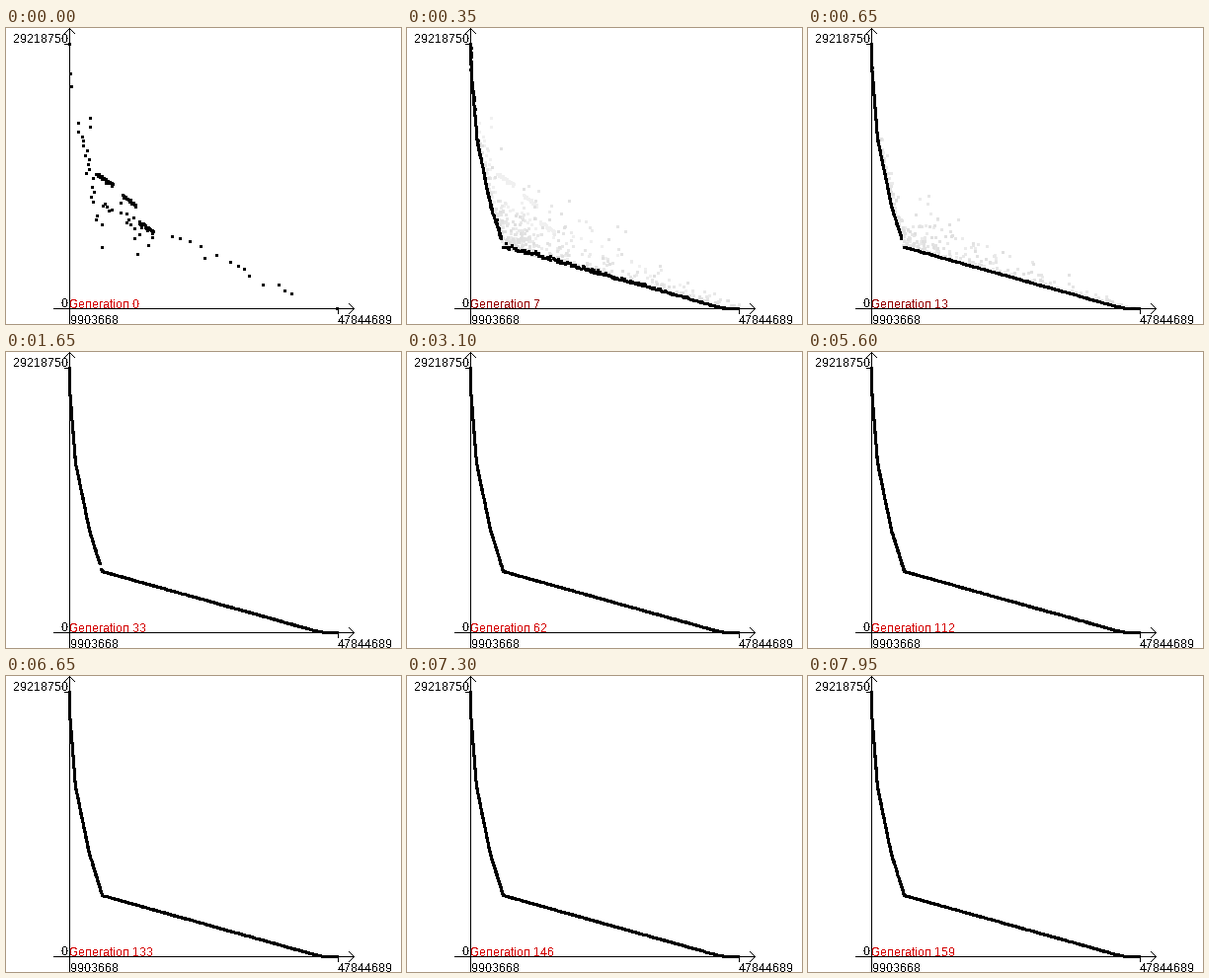
Animation of 400x300 px, one loop 8000 ms. Source, as a matplotlib script:

```python
import numpy as np
import matplotlib.pyplot as plt
from matplotlib.animation import FuncAnimation

W, H, FRAMES, STEP = 400, 300, 160, 50
PX = 0.72  # points per pixel at 100 dpi

plt.rcParams.update({
    "font.family": "Liberation Sans",
    "text.antialiased": False,
    "text.hinting": "default",
    "text.hinting_factor": 1,
})

# Corners of the Pareto front, in pixels
FRONT = np.array([(64, 16), (64.4, 42), (70, 112), (84, 180), (97, 222),
                  (312, 282), (322, 284), (335, 284)], float)
ARC = np.concatenate([[0], np.cumsum(np.hypot(*np.diff(FRONT, axis=0).T))])
KNEE, END = ARC[4], ARC[-1]


def on_front(s):
    return np.column_stack([np.interp(s, ARC, FRONT[:, k]) for k in (0, 1)])


def spread(s):
    """How far solutions scatter off the front, widest past the knee."""
    left = 5 + 18 * np.exp(-((s - KNEE) / 25) ** 2)
    right = 2 + 26 * np.clip((END - s) / (END - KNEE), 0, 1)
    return np.where(s < KNEE, left, right)


def lifted(s, amount):
    p = on_front(s)
    p[:, 0] += amount * np.where(s < KNEE, 0.9, 0.3)
    p[:, 1] -= amount * np.where(s < KNEE, 0.2, 0.9)
    return p


def segment(a, b, n):
    return np.linspace(a, b, n)


def first_population():
    rng = np.random.default_rng(4)
    extremes = [(64, 16), (65, 46), (66, 59), (97, 222), (133, 229), (335, 284)]
    left = segment((70, 91), (91, 199), 24)
    left[:, 0] += rng.exponential(4, len(left))
    middle = segment((109, 178), (143, 216), 18) + rng.normal(0, 5, (18, 2))
    tail = segment((166, 208), (289, 273), 14) + rng.normal(0, 2.5, (14, 2))
    parts = [extremes, left, middle, tail]
    for start in [(92, 148), (117, 169), (134, 196)]:
        streak = segment(start, np.add(start, (15, 11)), 26)
        parts.append(streak + rng.uniform(-1.2, 1.2, streak.shape))
    return np.vstack(parts)


START = first_population()
SAMPLES = on_front(np.linspace(0, END, 900))
EXCESS = np.array([np.hypot(*(SAMPLES - p).T).min() for p in START])


def survivors(gen):
    return EXCESS <= 45 * np.exp(-gen / 2.5)


def population(gen):
    if gen == 0:
        return START
    rng = np.random.default_rng(100 + gen)
    n = int(450 * min(1, 0.2 + gen / 10))
    s = (np.arange(n) + rng.uniform(0, 1, n)) / n * END
    s[0], s[-1] = 0, END
    p = lifted(s, spread(s) * np.abs(rng.normal(0, 1, n)) * np.exp(-gen / 3))
    gap = 4.6 - 0.07 * gen  # above the knee, closes slowly
    p = p[~((np.abs(p[:, 1] - 217) < gap) & (p[:, 0] < 99))]
    return np.vstack([START[survivors(gen)], p])if gen < 8 else p


def offspring(gen):
    rng = np.random.default_rng(900 + gen)
    n = int(110 * np.clip(1 - gen / 28, 0, 1))
    anywhere = rng.uniform(ARC[2], END, n)
    near_knee = KNEE + rng.normal(10, 30, n)
    s = np.where(rng.random(n) < 0.3, near_knee, anywhere)
    return lifted(s, spread(s) * rng.exponential(0.9, n) * np.exp(-gen / 14))


def stamp(img, points, shade):
    for x, y in np.rint(points).astype(int):
        img[max(y - 1, 0):y + 2, max(x - 1, 0):x + 2] = shade


def draw_axes(img):
    img[0:H, 64] = 0
    img[284, 48:353] = 0
    img[16, 59:65] = 0
    img[284:290, 336] = 0
    for k in range(6):
        img[k, [64 - k, 64 + k]] = 0
        img[[284 - k, 284 + k], 352 - k] = 0


def picture(gen):
    img = np.full((H, W), 255, np.uint8)
    if 0 < gen < 8:
        stamp(img, START[~survivors(gen)], 205 + 5 * gen)
    for age in range(5, 0, -1):
        if gen >= age:
            stamp(img, offspring(gen - age), 220 + 3 * age)
    draw_axes(img)
    stamp(img, population(gen), 0)
    return img


fig = plt.figure(figsize=(W / 100, H / 100), dpi=100, facecolor="white")
ax = fig.add_axes([0, 0, 1, 1])
ax.axis("off")
view = ax.imshow(picture(0), cmap="gray", vmin=0, vmax=255, aspect="auto",
                 interpolation="nearest", extent=(0, W, H, 0))


def label(x, y, text):
    return ax.text(x, y, text, fontsize=12 * PX, ha="left", va="baseline")


label(7, 15, "29218750")
label(56, 283, "0")
label(65, 300, "9903668")
label(336, 300, "47844689")
counter = label(64, 284, "Generation 0")


def update(gen):
    view.set_data(picture(gen))
    counter.set_text(f"Generation {gen}")
    # the label is darker while the grey cloud shows
    counter.set_color("#960000" if 0 < gen < 28 else "#d40000")
    return view, counter


anim = FuncAnimation(fig, update, frames=FRAMES, interval=STEP,
                     repeat=True, repeat_delay=0)
plt.show()
```
